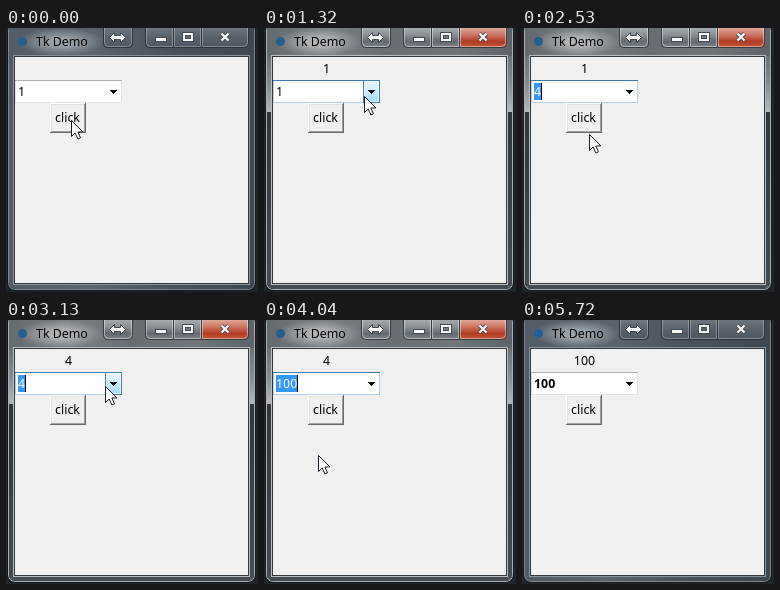
An HTML page with a canvas for the animation above (5820 ms loop, 252 by 264 pixels).

```html
<!DOCTYPE html>
<html lang="en">
<head>
<meta charset="utf-8">
<title>Tk Demo</title>
<style>
html, body { margin: 0; width: 100%; height: 100%; overflow: hidden; background: #20262c; }
canvas { display: block; }
</style>
</head>
<body>
<canvas id="stage" width="252" height="264"></canvas>
<script>
const ctx = document.getElementById('stage').getContext('2d');
const LOOP = 5820;
const FONT = '12.4px "Noto Sans", "Open Sans", sans-serif';
const ITEMS = ['1', '2', '4', '42', '100'];
const LIST_TOP = 77, ROW = 18;

// Sampled pointer positions: time, x, y
const POINTER = [
  [0, 65, 92], [720, 67, 92], [870, 72, 89], [1020, 82, 82], [1170, 93, 74],
  [1320, 100, 68], [1620, 95, 84], [1770, 83, 102], [1920, 71, 116],
  [2530, 67, 106], [2680, 64, 92], [2980, 82, 80], [3130, 99, 66],
  [3400, 93, 84], [3520, 74, 122], [3640, 61, 157],
  [4040, 54, 135], [4190, 58, 108], [4340, 67, 92],
  [4790, 106, 146], [4940, 145, 202]
];

const between = (t, a, b) => t >= a && t < b;

function stateAt(t) {
  const [, x, y] = POINTER.filter(p => p[0] <= t).pop();
  const value = t < 2380 ? '1' : t < 4040 ? '4' : '100';
  const open = between(t, 1470, 2380) || between(t, 3280, 4040);
  const row = y >= LIST_TOP ? Math.floor((y - LIST_TOP) / ROW) : ITEMS.indexOf(value);
  return {
    x, y, value, open, row,
    active: between(t, 250, 5470),
    pointer: t < 5470,
    label: t < 570 ? '' : t < 2830 ? '1' : t < 4490 ? '4' : '100',
    selected: between(t, 2380, 5470),
    caret: !between(t, 4640, 4940),
    focused: between(t, 1470, 5470),
    hover: x >= 99 && x < 116 && y >= 52 && y < 76,
    pressed: between(t, 250, 570) || between(t, 2680, 2830) || between(t, 4340, 4490),
    settled: t >= 5720
  };
}

function rect(x, y, w, h, fill) {
  ctx.fillStyle = fill;
  ctx.fillRect(x, y, w, h);
}

function frame(x, y, w, h, color) {
  ctx.strokeStyle = color;
  ctx.lineWidth = 1;
  ctx.strokeRect(x + 0.5, y + 0.5, w - 1, h - 1);
}

function gradient(x0, y0, x1, y1, ...colors) {
  const g = ctx.createLinearGradient(x0, y0, x1, y1);
  colors.forEach((c, i) => g.addColorStop(i / (colors.length - 1), c));
  return g;
}

function text(str, x, y, color = '#000', align = 'left', weight = '') {
  ctx.font = weight + ' ' + FONT;
  ctx.textAlign = align;
  ctx.fillStyle = color;
  ctx.fillText(str, x, y);
}

function polygon(points, fill, stroke) {
  ctx.beginPath();
  points.forEach(([x, y]) => ctx.lineTo(x, y));
  ctx.closePath();
  if (fill) { ctx.fillStyle = fill; ctx.fill(); }
  if (stroke) { ctx.strokeStyle = stroke; ctx.lineWidth = 1; ctx.stroke(); }
}

function rounded(x, y, w, h, radii, fill, stroke) {
  ctx.beginPath();
  ctx.roundRect(x, y, w, h, radii);
  if (fill) { ctx.fillStyle = fill; ctx.fill(); }
  if (stroke) { ctx.strokeStyle = stroke; ctx.lineWidth = 1; ctx.stroke(); }
}

function drawGlass(active) {
  rect(0, 0, 252, 264, '#20262c');
  rounded(2.5, -4.5, 246, 266, 6,
    active ? gradient(0, 0, 252, 0, '#63686d', '#7b8084', '#686d72', '#70757a', '#5c6267')
           : gradient(0, 0, 252, 0, '#505b65', '#5a656f', '#46515b', '#3c4750'));
  if (active) {
    for (const x of [3, 244]) {
      rect(x, 28, 4, 56, gradient(0, 28, 0, 84, '#6c7176', '#858a8e', '#b4b8bb'));
      rect(x, 84, 4, 174, gradient(0, 84, 0, 258, '#2f353b', '#394047', '#444b52'));
    }
    rect(6, 257, 238, 4, '#444b52');
  }
  rounded(2.5, -4.5, 246, 266, 6, null, active ? '#a9afb3' : '#7c8790');
  rounded(1.5, -5.5, 248, 268, 7, null, '#14191d');

  ctx.save();
  ctx.translate(55, 14);
  ctx.scale(1, 0.33);
  const glow = ctx.createRadialGradient(0, 0, 12, 0, 0, 43);
  glow.addColorStop(0, active ? 'rgba(205,208,210,.65)' : 'rgba(190,196,201,.65)');
  glow.addColorStop(1, 'rgba(190,196,201,0)');
  ctx.fillStyle = glow;
  ctx.fillRect(-45, -42, 90, 84);
  ctx.restore();

  ctx.beginPath();
  ctx.arc(16.5, 13.5, 4.5, 0, Math.PI * 2);
  ctx.fillStyle = '#245f91';
  ctx.fill();
  text('Tk Demo', 30, 18);
}

function drawCaptionButtons(active) {
  const face = active
    ? gradient(0, 0, 0, 20, '#a4a9ad', '#8b9196', '#626970', '#7c8389')
    : gradient(0, 0, 0, 20, '#6d7780', '#56616b', '#4b5660');
  const red = active
    ? gradient(0, 0, 0, 20, '#dfa596', '#cd7764', '#b43b24', '#c85a3c')
    : face;
  const edge = active ? '#343a40' : '#2a333b';
  const shine = active ? 'rgba(255,255,255,.45)' : 'rgba(255,255,255,.3)';

  for (const [x, w, fill, radii] of [
    [97, 29, face, [0, 0, 4, 4]],
    [139, 28, face, [0, 0, 0, 4]],
    [167, 28, face, 0],
    [195, 47, red, [0, 0, 4, 0]]
  ]) {
    rounded(x + 0.5, -1.5, w, 21, radii, fill, edge);
    rounded(x + 1.5, -0.5, w - 2, 19, radii, null, shine);
  }

  const white = '#f8f8f8', dark = '#424a52';
  polygon([[103.5, 9.5], [108.5, 4.5], [108.5, 7.5], [114.5, 7.5], [114.5, 4.5], [119.5, 9.5],
    [114.5, 14.5], [114.5, 11.5], [108.5, 11.5], [108.5, 14.5]], white, dark);
  rect(149, 9, 12, 5, dark);
  rect(150, 10, 10, 3, white);
  rect(176, 4, 12, 10, dark);
  rect(177, 5, 10, 8, white);
  rect(179, 7, 6, 4, dark);
  rect(180, 8, 4, 2, active ? '#737a80' : '#5a656f');

  ctx.beginPath();
  ctx.moveTo(215.5, 5.5); ctx.lineTo(222.5, 12.5);
  ctx.moveTo(222.5, 5.5); ctx.lineTo(215.5, 12.5);
  for (const [color, width] of [[dark, 4], [white, 2.3]]) {
    ctx.strokeStyle = color;
    ctx.lineWidth = width;
    ctx.stroke();
  }
}

function drawButton(pressed) {
  const bevel = ['#ffffff', '#e3e3e3', '#a0a0a0', '#696969'];
  const [a, b, c, d] = pressed ? bevel.reverse() : bevel;
  rect(44, 75, 36, 30, d);
  rect(44, 75, 35, 29, a);
  rect(45, 76, 34, 28, c);
  rect(45, 76, 33, 27, b);
  rect(46, 77, 32, 26, '#f0f0f0');
  const shift = pressed ? 1 : 0;
  text('click', 61.5 + shift, 94 + shift, '#000', 'center');
}

function drawCombo(s) {
  const lit = s.focused || s.hover;
  rect(9, 52, 107, 23, '#fff');
  frame(9, 52, 107, 23, lit ? '#b5cfe7' : '#e2e3ea');
  rect(9, 52, 107, 1, lit ? '#3d7bad' : '#abadb3');

  if (s.open || s.hover) {
    rect(99, 52, 17, 23, s.open
      ? gradient(0, 53, 0, 74, '#d5ecf8', '#b5dcf0', '#83c1e0', '#6cafd2')
      : gradient(0, 53, 0, 74, '#eaf6fd', '#d9f0fc', '#bee6fd', '#a7d9f5'));
    frame(99, 52, 17, 23, s.open ? '#2c628b' : '#3c7fb1');
    if (!s.open) frame(100, 53, 15, 21, 'rgba(255,255,255,.7)');
  }
  for (let i = 0; i < 4; i++) rect(104 + i, 62 + i, 7 - 2 * i, 1, '#000');

  if (s.selected) {
    const width = s.value.length * 7;
    rect(12, 55, width, 17, '#3399ff');
    if (s.caret) rect(12 + width, 55, 1, 17, '#000');
  }
  text(s.value, 12, 68, s.selected ? '#fff' : '#000', 'left', s.settled ? '600' : '');
}

function drawList(row) {
  rect(9, 75, 107, 94, '#fff');
  frame(9, 75, 107, 94, '#dcdcdc');
  ITEMS.forEach((item, i) => {
    const y = LIST_TOP + i * ROW;
    if (i === row) rect(11, y, 103, ROW, '#3399ff');
    text(item, 11, y + 13, i === row ? '#fff' : '#000');
  });
}

function drawPointer(x, y) {
  ctx.save();
  ctx.translate(x + 0.5, y + 0.5);
  polygon([[0, 0], [0, 16], [3.7, 12.5], [6.4, 18.5], [9, 17.3], [6.3, 11.5], [11.4, 11.4]],
    '#fff', '#1c1c2c');
  ctx.restore();
}

function draw(s) {
  drawGlass(s.active);
  drawCaptionButtons(s.active);
  frame(7, 27, 237, 230, s.active ? '#b9bec2' : '#89939b');
  frame(8, 28, 235, 228, '#30373d');
  rect(9, 29, 233, 226, '#f0f0f0');
  text(s.label, 62.5, 45, '#000', 'center');
  drawButton(s.pressed);
  drawCombo(s);
  if (s.open) drawList(s.row);
  if (s.pointer) drawPointer(s.x, s.y);
}

const start = performance.now();
function tick() {
  draw(stateAt((performance.now() - start) % LOOP));
  requestAnimationFrame(tick);
}
tick();
</script>
</body>
</html>
```
